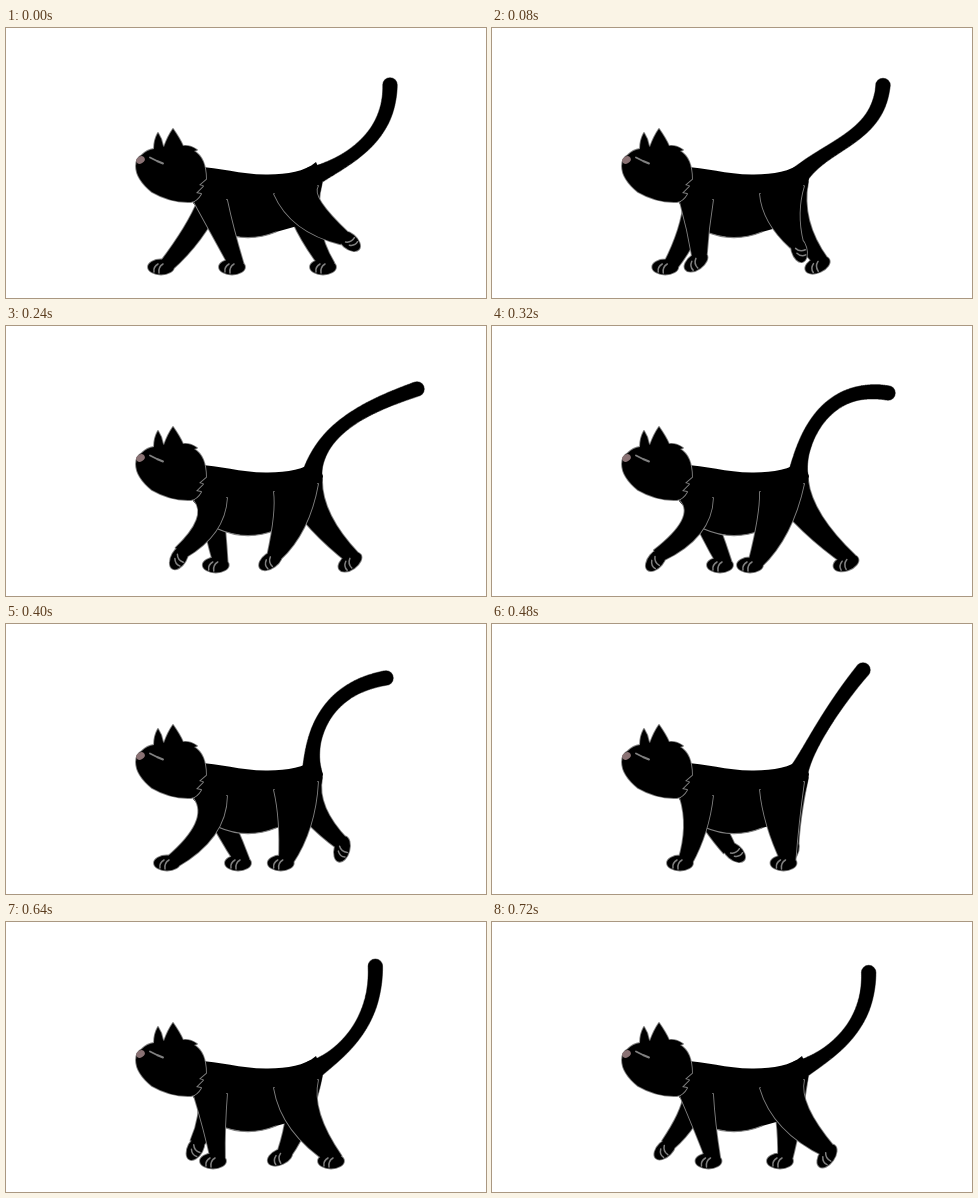
Write an HTML page with a canvas that moves like this. It is 480 px wide and 270 px high and loops after 0.8 s.

```html
<!DOCTYPE html>
<html lang="en">
<head>
<meta charset="utf-8">
<title>Walking cat</title>
<style>
  html, body { margin: 0; width: 100%; height: 100%; overflow: hidden; background: #fff; }
  canvas { display: block; }
</style>
</head>
<body>
<canvas id="stage" width="480" height="270"></canvas>
<script>
const ctx = document.getElementById('stage').getContext('2d');
const STEP = 80, STEPS = 10;
const BLACK = '#000', GREY = '#808080', NOSE = '#8a7274';

// Key poses of each paw: step, x, y, tilt in degrees. Knees follow from hip and paw.
const legs = {
  farFront: {
    front: [192, 172], back: [216, 174], width: 10, bend: [0, 4],
    keys: [[0, 155, 239, 0], [4, 228, 239, 0], [5, 232, 239, 0],
           [6, 242, 228, -140], [7, 206, 225, -80], [9, 173, 227, -45]]
  },
  farHind: {
    front: [278, 168], back: [316, 154], width: 12, bend: [-7, 4],
    keys: [[0, 317, 239, 0], [2, 334, 235, -50], [4, 354, 237, -20],
           [5, 336, 225, -75], [7, 260, 231, -50], [9, 288, 239, 0]]
  },
  nearHind: {
    front: [268, 166], back: [312, 158], width: 16, bend: [-10, 4],
    keys: [[0, 343, 213, -140], [2, 271, 230, -72], [4, 258, 239, 0],
           [8, 325, 239, 0], [9, 335, 234, -55]]
  },
  nearFront: {
    front: [188, 174], back: [221, 172], width: 11, bend: [0, 14],
    keys: [[0, 226, 239, 0], [2, 182, 229, -70], [4, 164, 234, -50],
           [5, 161, 239, 0], [6, 188, 239, 0]]
  }
};

// Tail as one Bezier curve: step, two control points, tip.
const tailRoot = [306, 149];
const tailKeys = [
  [0, 345, 132, 384, 108, 384, 57],
  [2, 325, 100, 388, 112, 398, 58],
  [3, 314, 102, 362, 80, 411, 63],
  [4, 309, 112, 334, 57, 396, 67],
  [5, 303, 108, 322, 64, 380, 54],
  [7, 335, 130, 364, 95, 362, 38]
];

const body = new Path2D('M190 139C215 139 235 147 262 146.500C282 146 298 144 310 134L317 150C316 160 311 178 302 195L270 204C250 212 230 211 212 203L187 175Z');
const belly = new Path2D('M212 203C230 211 250 212 270 204');
const head = new Path2D('M130 138Q130 130 136 127Q141 122 148 121Q148 112 152 105Q156 111 157 118L158 119Q162 108 167 101Q174 111 177 118Q184 117 191 122L188 123Q200 130 200 151L193 157L197 158L190 165L195 166Q191 173 185 174Q165 175 146 164Q130 151 130 138Z');
const eye = new Path2D('M144 129.500L151 133L157 135.500');

const clamp = (v, [min, max]) => Math.max(min, Math.min(max, v));

// Linear blend between the surrounding keys of a cyclic track.
function poseAt(keys, step) {
  const i = keys.findLastIndex(k => k[0] <= step);
  const a = keys[i], b = keys[(i + 1) % keys.length];
  const u = (step - a[0]) / ((b[0] - a[0] + STEPS) % STEPS);
  return a.slice(1).map((v, n) => v + (b[n + 1] - v) * u);
}

function line(path, width = 1.3) {
  ctx.strokeStyle = GREY;
  ctx.lineWidth = width;
  ctx.stroke(path);
}

function shape(path) {
  line(path, 1.8);
  ctx.fillStyle = BLACK;
  ctx.fill(path);
}

// Offset a point sideways from the direction a -> b.
function offset(p, a, b, d) {
  const dx = b[0] - a[0], dy = b[1] - a[1], len = Math.hypot(dx, dy);
  return [p[0] - dy / len * d, p[1] + dx / len * d];
}

// Quadratic curve from a to b whose middle lies on m.
function curveThrough(path, a, m, b) {
  const c = i => 2 * m[i] - (a[i] + b[i]) / 2;
  path.quadraticCurveTo(c(0), c(1), ...b);
}

function drawLeg({ front, back, width, bend, keys }, step) {
  const [px, py, tilt] = poseAt(keys, step);
  const a = tilt * Math.PI / 180, cos = Math.cos(a), sin = Math.sin(a);
  const hip = [(front[0] + back[0]) / 2, (front[1] + back[1]) / 2];
  const ankle = [px + 5 * cos + sin, py + 5 * sin - cos];
  const knee = [
    (hip[0] + ankle[0]) / 2 + clamp(0.35 * (hip[0] - ankle[0]), bend),
    (hip[1] + ankle[1]) / 2
  ];
  const kneeSide = d => offset(knee, hip, ankle, d);
  const ankleSide = d => offset(ankle, knee, ankle, d);

  const path = new Path2D();
  path.moveTo(...front);
  curveThrough(path, front, kneeSide(width), ankleSide(7));
  path.lineTo(...ankleSide(-7));
  curveThrough(path, ankleSide(-7), kneeSide(-width), back);
  path.moveTo(px + 13 * cos, py + 13 * sin);
  path.ellipse(px, py, 13, 7.5, a, 0, 2 * Math.PI, true);
  shape(path);

  ctx.save();
  ctx.translate(px, py);
  ctx.rotate(a);
  line(new Path2D('M-7 5Q-8 0 -3 -3M-2 6Q-3 0 2 -3'), 1.5);
  ctx.restore();
}

function drawTail(step) {
  const [x1, y1, x2, y2, x3, y3] = poseAt(tailKeys, step);
  const bezier = (t, a, b, c, d) =>
    (1 - t) ** 3 * a + 3 * t * (1 - t) ** 2 * b + 3 * t * t * (1 - t) * c + t ** 3 * d;
  for (const [color, grow] of [[GREY, 0.5], [BLACK, 0]]) {
    ctx.fillStyle = color;
    ctx.beginPath();
    for (let t = 0; t <= 1; t += 1 / 160) {
      const r = 6 + 1.3 * t * t + 4 * (1 - t) ** 6 + grow;
      const x = bezier(t, tailRoot[0], x1, x2, x3), y = bezier(t, tailRoot[1], y1, y2, y3);
      ctx.moveTo(x + r, y);
      ctx.arc(x, y, r, 0, 2 * Math.PI);
    }
    ctx.fill();
  }
}

function drawHead() {
  shape(head);
  line(eye, 1.9);
  ctx.fillStyle = NOSE;
  ctx.beginPath();
  ctx.ellipse(134.5, 132, 4.5, 3.5, -0.5, 0, 2 * Math.PI);
  ctx.fill();
}

function render() {
  const step = Math.floor(performance.now() / STEP) % STEPS;
  ctx.fillStyle = '#fff';
  ctx.fillRect(0, 0, 480, 270);
  drawTail(step);
  drawLeg(legs.farFront, step);
  drawLeg(legs.farHind, step);
  ctx.fillStyle = BLACK;
  ctx.fill(body);
  line(belly);
  drawLeg(legs.nearHind, step);
  drawLeg(legs.nearFront, step);
  drawHead();
  requestAnimationFrame(render);
}

ctx.lineCap = ctx.lineJoin = 'round';
render();
</script>
</body>
</html>
```
